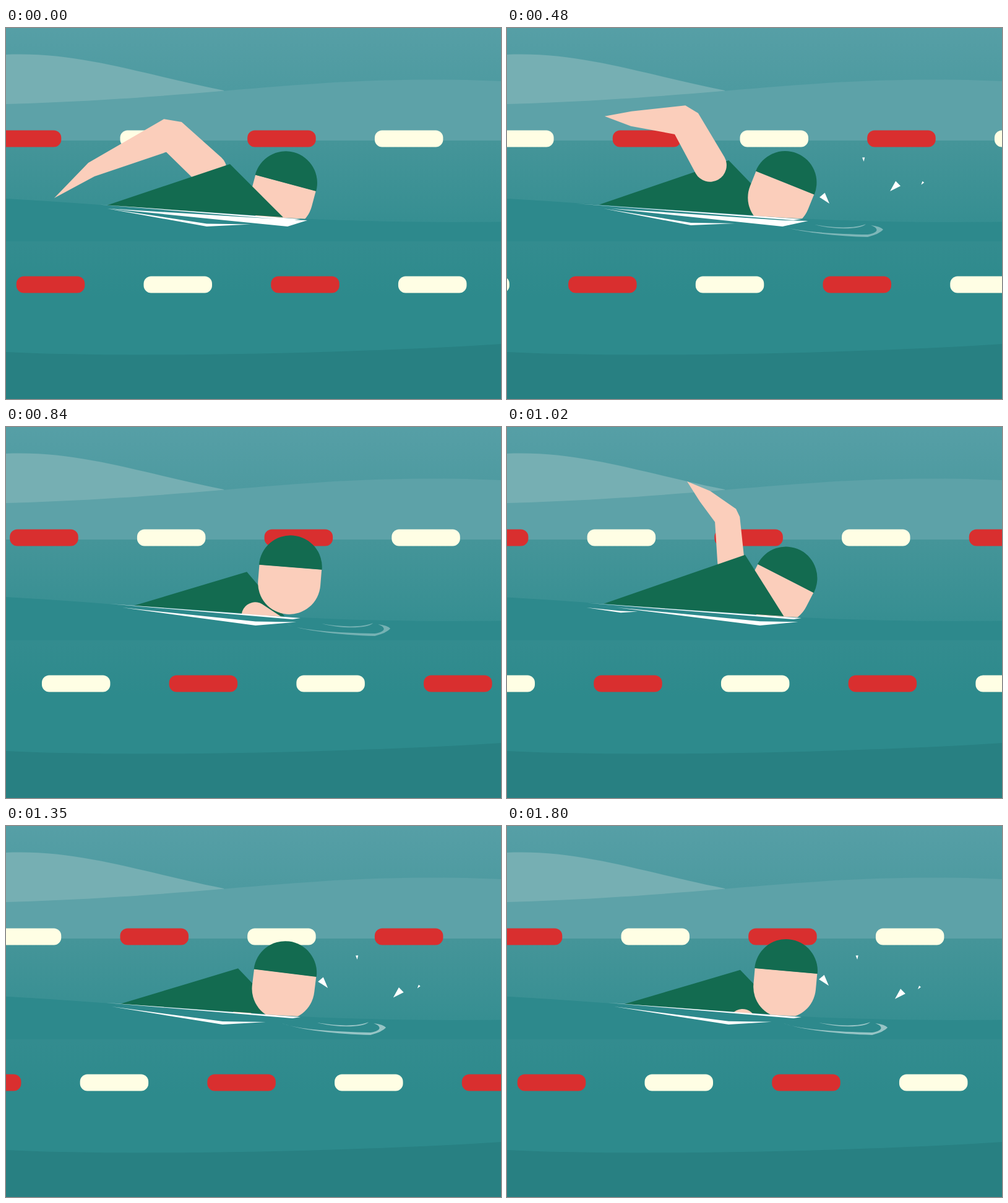
Recreate the animation shown at these times as an HTML page. Size 800 by 600 pixels, loop 1830 ms.

```html
<!DOCTYPE html>
<html lang="en">
<head>
<meta charset="utf-8">
<title>Swimmer</title>
<style>
html, body { margin: 0; width: 100%; height: 100%; overflow: hidden; background: #2d898c; }
svg { display: block; width: 100vw; height: 100vh; }
</style>
</head>
<body>
<svg viewBox="0 0 800 600" xmlns="http://www.w3.org/2000/svg">
  <defs>
    <linearGradient id="sky" x1="0" y1="0" x2="0" y2="1">
      <stop offset="0" stop-color="#569fa6"/><stop offset="1" stop-color="#46969b"/>
    </linearGradient>
    <linearGradient id="pool" x1="0" y1="0" x2="0" y2="1">
      <stop offset="0" stop-color="#459599"/><stop offset="1" stop-color="#358e91"/>
    </linearGradient>
    <linearGradient id="near" x1="0" y1="0" x2="0" y2="1">
      <stop offset="0" stop-color="#338c8f"/><stop offset="1" stop-color="#2d8a8c"/>
    </linearGradient>
  </defs>
  <rect width="800" height="182" fill="url(#sky)"/>
  <path d="M0 43C120 38 220 75 352 101V130H0Z" fill="#76afb3"/>
  <path d="M0 123C170 118 300 106 420 96C540 86 660 80 800 86V182H0Z" fill="#5da2a8"/>
  <rect y="182" width="800" height="140" fill="url(#pool)"/>
  <g id="farRope"></g>
  <g id="swimmer" fill="#fbcebb">
    <path id="farArm"/>
    <path id="torso" fill="#136b50"/>
    <g id="head">
      <path d="M-50.5 0V26A50.5 50.5 0 0 0 50.5 26V0Z"/>
      <path d="M-51 .3A51 51.5 0 0 1 51 .3Z" fill="#136b50"/>
    </g>
    <path id="nearArm"/>
  </g>
  <path id="water" fill="#2d898c"/>
  <rect y="345" width="800" height="90" fill="url(#near)"/>
  <rect y="435" width="800" height="165" fill="#2d8a8c"/>
  <path d="M0 524C200 534 560 526 800 511V600H0Z" fill="#288082"/>
  <g id="ripple" fill="#fff">
    <path d="M440 319C460 328 520 333 583 334C598 332 604 325 588 319Q604 321 608 326Q602 333 583 338C530 337 465 329 440 319Z"/>
    <path d="M497 318C530 324 565 324 580 317C572 326 530 327 497 318Z"/>
  </g>
  <path id="foam" fill="#fff"/>
  <g id="nearRope"></g>
</svg>
<script>
const $ = id => document.getElementById(id);
const { sin, cos, exp, min, max, hypot, floor, PI } = Math;
const LOOP = 1830, STEP = 30, STROKE = LOOP / 2, HALF = STROKE / 2;
const GAP = 205.714, PERIOD = 2 * GAP;

const mix = (a, b, k) => a + (b - a) * k;
const polygon = points => "M" + points.map(([x, y]) => `${x.toFixed(2)} ${y.toFixed(2)}`).join("L") + "Z";

// Cyclic curve that eases between a few [phase 0..1, value] points.
function curve(u, ...keys) {
  const first = keys[0], last = keys[keys.length - 1];
  const ring = [[last[0] - 1, last[1]], ...keys, [first[0] + 1, first[1]]];
  const i = ring.findIndex(key => key[0] > u);
  const [u0, v0] = ring[i - 1], [u1, v1] = ring[i];
  return mix(v0, v1, (1 - cos(PI * (u - u0) / (u1 - u0))) / 2);
}

function bodyAt(u) {
  const x = curve(u, [0, 452], [.12, 445], [.62, 493], [.93, 451]);
  const hip = curve(u, [0, 163], [.06, 146], [.33, 158], [.66, 254], [.93, 190]);
  return {
    x,
    y: curve(u, [0, 250.5], [.4, 241], [.7, 213], [.93, 234]),
    tilt: curve(u, [0, 15], [.06, 22.5], [.22, 27], [.36, 38.5], [.72, 4], [.93, 5]),
    hip: [hip, 280 + .042 * hip],
    shoulder: [
      curve(u, [.03, 358], [.58, 450], [.93, 377]),
      curve(u, [0, 220], [.05, 214], [.3, 205], [.65, 238], [.93, 233])
    ],
    chest: [446 + .3 * (x - 446), 306]
  };
}

// Joints through one stroke: time, shoulder, elbow, wrist, fingertip.
const poses = [
  [0, [329, 230], [266, 171], [138, 229], [78, 275]],
  [22, [328, 222], [287, 150], [200, 147], [157, 143]],
  [105, [362, 218], [356, 147], [320, 112], [291, 88]],
  [157, [346, 246], [517, 172], [618, 171], [662, 159]],
  [232, [375, 270], [520, 226], [640, 229], [684, 218]],
  [285, [452, 277], [556, 276], [660, 286], [700, 282]],
  [427, [380, 318], [400, 360], [405, 400], [400, 430]]
];

function armPath(p) {
  if (p > STROKE - 15) p -= STROKE;
  if (p < -15 || p > 440) return "";
  p = min(max(p, 0), 426);
  const i = poses.findIndex(pose => pose[0] > p);
  const [t0, ...from] = poses[i - 1], [t1, ...to] = poses[i];
  const [s, e, w, tip] = from.map((point, j) => point.map((v, k) => mix(v, to[j][k], (p - t0) / (t1 - t0))));

  // Point beside a joint, square to the limb a-b.
  const beside = (joint, a, b, d) => {
    const dx = b[0] - a[0], dy = b[1] - a[1], len = hypot(dx, dy);
    return [joint[0] - dy / len * d, joint[1] + dx / len * d];
  };
  const taper = 1 - .22 * min(1, p / 105);
  const shoulder = 28 * taper, elbow = 26 * taper, wrist = 12;
  const side = d => [
    beside(s, s, e, d * shoulder), beside(e, s, e, d * elbow),
    beside(e, e, w, d * elbow), beside(w, e, w, d * wrist)
  ];
  const left = side(-1), right = side(1).reverse();
  return `M${left.join("L")}L${tip}L${right.join("L")}A${shoulder} ${shoulder} 0 0 1 ${left[0]}Z`;
}

// A streak that thins out while it drifts back.
function wake(age, x, start, thickness, lag) {
  const bottom = min(321, 270 + .165 * x), top = bottom - thickness * exp(-age / 220);
  const reach = min(75 - lag * exp(-age / 90), (x - start) / 2);
  return polygon([[start, min(292, bottom - 2)], [x, top], [x + reach, top + 1], [x, bottom]]);
}

function wakes(p, u) {
  const start = curve(u, [0, 150], [.06, 108], [.57, 190], [.93, 163]);
  let d = polygon([[start, 280 + .036 * start], [476, 309], [463, 311]]);
  if (p < 310) d += wake(p, 455 - .44 * p, 165 + .12 * p, 11, 43);
  const age = (p < 260 ? p + HALF : p) - 285;
  if (age < 340) d += wake(age, 479 - .62 * age - .0016 * age * age, 220 - .33 * age, 10, 27);
  return d;
}

const drops = [
  { x: 520, y: 258, vx: .02, vy: .49, size: 19, lean: -.7 },
  { x: 627, y: 280, vx: -.15, vy: -.3, size: 19, lean: .8 },
  { x: 566, y: 216, vx: .2, vy: 0, size: 7, lean: -.07 },
  { x: 664, y: 264, vx: .1, vy: -.2, size: 6, lean: .66 }
];
function splash(p) {
  if (p < 385 || p > 515) return "";
  return drops.map(({ x, y, vx, vy, size, lean }) => {
    const tip = [x + vx * (p - 427), y + vy * (p - 427)];
    const corner = a => [tip[0] + size * sin(a), tip[1] - size * cos(a)];
    return polygon([tip, corner(lean - .3), corner(lean + .3)]);
  }).join("");
}

function buildRope(id, y) {
  for (let i = 0; i < 7; i++) {
    const pill = document.createElementNS("http://www.w3.org/2000/svg", "rect");
    const attrs = { x: i * GAP, y, width: 110.5, height: 27, rx: 12, fill: i % 2 ? "#fffee4" : "#d92f2f" };
    for (const name in attrs) pill.setAttribute(name, attrs[name]);
    $(id).append(pill);
  }
}
function moveRope(id, start, laps, t) {
  const x = start - laps * PERIOD * t / 1800;
  $(id).setAttribute("transform", `translate(${((x % PERIOD) + PERIOD) % PERIOD - PERIOD})`);
}

function draw(t) {
  const set = (id, value, name = "d") => $(id).setAttribute(name, value);
  const p = t % HALF, u = p / HALF, body = bodyAt(u);
  set("head", `translate(${body.x} ${body.y}) rotate(${body.tilt})`, "transform");
  set("torso", polygon([body.hip, body.shoulder, body.chest]));
  set("farArm", armPath(t % STROKE));
  set("nearArm", armPath((t + HALF) % STROKE));

  // The body rolls: the chest hides the face while the far arm recovers.
  const order = t % STROKE < 200 ? ["head", "torso"] : ["torso", "head"];
  for (const id of order) $("swimmer").insertBefore($(id), $("nearArm"));

  const lift = 1 + cos(2 * PI * (u - .57));
  set("water", `M0 ${276 - lift}C260 ${290 - lift} 440 318 800 313.5V346H0Z`);

  // Splash after each hand entry; none is left over at the start of the loop.
  const q = p < 200 && t > HALF ? p + HALF : p;
  set("foam", wakes(p, u) + splash(q));
  set("ripple", .5 * max(0, min(1, (q - 345) / 55, (560 - q) / 105)), "opacity");
  set("ripple", `translate(${(480 - q) * .135})`, "transform");

  moveRope("farRope", 390.2, 2, t);
  moveRope("nearRope", 16.8, 3, t);
}

buildRope("farRope", 165.5);
buildRope("nearRope", 401.5);
const begin = performance.now();
function tick() {
  draw(floor((performance.now() - begin) % LOOP / STEP) * STEP);
  requestAnimationFrame(tick);
}
tick();
</script>
</body>
</html>
```
